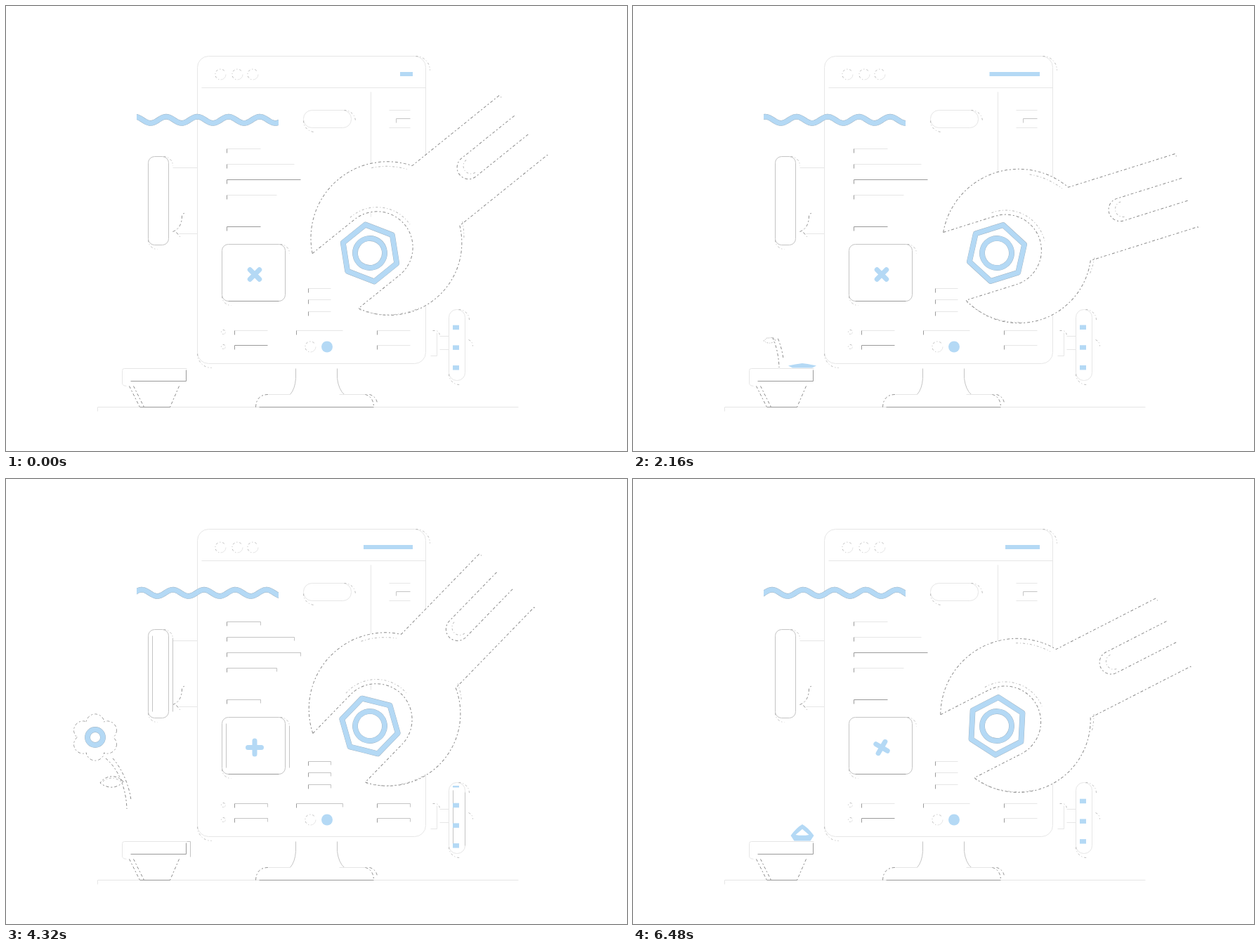
Animation of 884 by 634 pixels, one loop 6.56 s. Source, as an HTML page:

```html
<!DOCTYPE html>
<html lang="en">
<head>
<meta charset="utf-8">
<title>Site under repair</title>
<style>
html, body { margin: 0; width: 100%; height: 100%; overflow: hidden; background: #fff; }
svg { display: block; width: 884px; height: 634px; }
path, rect, circle, polyline, polygon { fill: none; stroke-width: 1; }
.light { stroke: #e6e6e6; }
.mid { stroke: #c4c4c4; }
.dark { stroke: #9a9a9a; }
.dash { stroke: #bbb; stroke-dasharray: 3 3 1 3; }
.edge { stroke: #8c8c8c; stroke-dasharray: 4 3 2 3; }
.white { fill: #fff; }
.blue { fill: #b4d9f5; }
.band { stroke: #b4d9f5; stroke-width: 7; stroke-linejoin: round; }
.rim { stroke: #9fb1bf; stroke-width: 7.8; stroke-linejoin: round; }
</style>
</head>
<body>
<svg viewBox="0 0 884 634">
  <defs>
    <clipPath id="waveClip"><rect x="186" y="150" width="202" height="24"/></clipPath>
    <clipPath id="stemClip"><rect id="stemBox" x="150" width="80" height="200"/></clipPath>
  </defs>
  <g id="scene" transform="translate(.5 .5)"></g>
  <g id="extra" transform="translate(.5 .5)"></g>

  <rect id="bar" class="blue" y="94" height="6"/>
  <circle class="blue" cx="457" cy="485.5" r="8"/>
  <g clip-path="url(#waveClip)">
    <polyline id="waveRim" class="rim"/>
    <polyline id="wave" class="band"/>
  </g>
  <path id="cross" d="M-9.5 0H9.5M0 -9.5V9.5" style="stroke:#b4d9f5;stroke-width:7;stroke-linecap:round"/>
  <g id="valve"></g>

  <g id="plant">
    <g clip-path="url(#stemClip)">
      <path class="edge" d="M178 443C196 458 207 485 208 515M188 443C203 460 212 485 214 503"/>
    </g>
    <g id="leaf">
      <path class="edge" d="M0 0C-8 -10 -25 -10 -33 2C-22 11 -8 10 0 0"/>
      <path class="dash" d="M-29 0C-22 -7 -10 -6 -4 0"/>
    </g>
    <g id="bloom">
      <g id="petals"></g>
      <circle class="rim" r="11"/>
      <circle class="band" r="11"/>
    </g>
  </g>
  <path id="drop" class="blue" d="M0 -10C3 -4 8 -1 8 3A8 7 0 0 1 -8 3C-8 -1 -3 -4 0 -10Z"/>
  <path id="splash" class="blue" fill-rule="evenodd"/>

  <g id="wrench">
    <path class="white" d="M-64 -51H13A51 51 0 0 1 13 51H-64A109 109 0 0 0 129 50H286V-59H125A109 109 0 0 0 -64 -51Z"/>
    <path class="edge" d="M-64 -51A109 109 0 0 1 125 -59H284l1 4"/>
    <path class="edge" d="M-62 51A103 103 0 0 0 124 50H284l1 4"/>
    <path class="dash" d="M-62 53A109 109 0 0 0 5 105M118 67A109 109 0 0 0 131 47M78 -93A103 103 0 0 1 116 -60"/>
    <path class="edge" d="M-64 -51H13A51 51 0 0 1 13 51H-62"/>
    <path class="dash" d="M10 -57A57 57 0 0 1 70 4"/>
    <path class="edge" d="M283 -23H186A16.5 16.5 0 0 0 186 10H283"/>
    <path class="dash" d="M190 -17A11 11 0 0 0 190 5"/>
  </g>
  <g id="nut">
    <polygon class="rim"/>
    <polygon class="band"/>
    <circle class="rim" r="21"/>
    <circle class="band" r="21"/>
  </g>
</svg>
<script>
const LOOP = 6560, STEP = 80;
const $ = id => document.getElementById(id);
const set = (id, attrs) => { for (const k in attrs) $(id).setAttribute(k, attrs[k]); };
const show = (id, on) => { $(id).style.display = on ? '' : 'none'; };
const clamp = x => Math.min(1, Math.max(0, x));
const smooth = x => (1 - Math.cos(Math.PI * clamp(x))) / 2;

// Eased track: time, value, time, value, ...
function track(t, keys) {
  for (let i = 2; i < keys.length; i += 2) {
    if (t <= keys[i]) {
      const [t0, a, t1, b] = keys.slice(i - 2, i + 2);
      return a + (b - a) * smooth((t - t0) / (t1 - t0));
    }
  }
  return keys[keys.length - 1];
}

let scene = '', extra = '';
const path = (cls, d) => { scene += `<path class="${cls}" d="${d}"/>`; };
const more = (cls, d) => { extra += `<path class="${cls}" d="${d}"/>`; };

// Panel with a thick white rim: its lit edges, plus two broken corners
function panel(x, y, w, h, r, cls = 'light') {
  const R = r + 4;
  scene += `<rect class="${cls}" x="${x}" y="${y}" width="${w}" height="${h}" rx="${r}"/>`;
  path('dash', `M${x + w + 6 - R} ${y}a${R} ${R} 0 0 1 ${R} ${R}M${x} ${y + h + 6 - R}a${R} ${R} 0 0 0 ${R} ${R}`);
}
// Far sides of the rim, seen only briefly
function farSides(x, y, w, h, r) {
  more('mid', `M${x + 6} ${y + r}V${y + h - r}M${x + w + 6} ${y + r + 3}V${y + h - r}`);
}
function row(x, y, w, cls = 'light') {
  path(cls, `M${x} ${y}h${w}`);
  path('dark', `M${x} ${y}v6`);
  more('mid', `M${x} ${y}h${w}v5`);
}
function ring(x, y, r) {
  path('dash', `M${x + r * .7} ${y - r * .7}A${r} ${r} 0 1 0 ${x} ${y + r}`);
  path('light', `M${x + r} ${y}A${r} ${r} 0 0 1 ${x} ${y + r}`);
}

// Window
panel(272, 71, 325, 438, 16);
path('light', 'M278 116H597M519 122V300');
[305, 329, 351].forEach(x => ring(x, 97, 7.5));
panel(423, 148, 68, 25, 12);
path('light', 'M545 148h30M545 173h30');
path('mid', 'M555 166v-6h20');
row(314, 203, 48);
row(314, 225, 96);
row(314, 247, 105, 'dark');
row(314, 269, 71);
row(314, 314, 48, 'dark');
panel(307, 339, 90, 81, 9, 'mid');
farSides(307, 339, 90, 81, 9);
path('dark', 'M316 420H388');
[402, 418, 435].forEach(y => row(430, y, 32));
[464, 485].forEach(y => ring(309, y, 3));
row(325, 462, 47);
row(325, 483, 47, 'dark');
row(413, 462, 66);
row(528, 462, 47);
row(528, 483, 47);
ring(433, 485, 7.5);

// Floor and stand
path('light', 'M130 577V571H729');
path('mid', 'M412 516V530Q411 545 404 553M471 516V530Q473 546 481 553');
path('light', 'M373 553H404M474 553H511');
path('edge', 'M355 571Q356 553 373 553M511 553Q522 556 523 570M517 553Q527 556 528 566');
path('dark', 'M360 571H523');

// Tap
panel(202, 214, 29, 126, 9, 'mid');
farSides(202, 214, 29, 126, 9);
path('light', 'M237 230H272M272 324H246');
path('edge', 'M237 321Q250 316 250 298q2 -5 6 -2M242 322l5 6');

// Valve
panel(630, 432, 23, 101, 11);
farSides(630, 432, 17, 101, 11);
path('light', 'M604 498H613V465M617 470H630M617 489H630');
path('dash', 'M607 462H612Q617 464 617 470M658 475Q664 478 664 484');

// Pot
path('light', 'M257 516H168Q165 516 165 519V538Q166 541 171 541');
path('dark', 'M177 534H256V518M190 571H233');
path('edge', 'M175 541L190 571M181 541L196 571M246 541L233 571');
more('mid', 'M257 516H262V538');

$('scene').innerHTML = scene;
$('extra').innerHTML = extra;

// Petals: outlines first, white discs over them
const petals = (cls, r) => Array.from({ length: 6 }, (_, i) => {
  const a = (i * 60 + 30) * Math.PI / 180;
  return `<circle class="${cls}" cx="${20 * Math.cos(a)}" cy="${20 * Math.sin(a)}" r="${r}"/>`;
}).join('');
$('petals').innerHTML = petals('edge', 13) + petals('white', 12.5) + '<circle class="white" r="20"/>';

$('valve').innerHTML = '<rect class="blue" x="636" width="9" height="6"/>'.repeat(4);
const cogs = [...$('valve').children];

const hex = Array.from({ length: 6 }, (_, i) =>
  [41 * Math.sin(i * Math.PI / 3), -41 * Math.cos(i * Math.PI / 3)].join()).join(' ');
document.querySelectorAll('#nut polygon').forEach(p => p.setAttribute('points', hex));

function turnWrench(t) {
  const a = track(t, [-206, 16.5, 108, 47, 240, 47, 660, 16.5, 800, 16.5, 1180, 47, 1440, 47,
    1960, 16.5, 2110, 16.5, 2560, 47, 2840, 47, 3360, 16.5, 3580, 16.5, 3920, 47, 4260, 47,
    4750, 16.5, 4810, 16.5, 5190, 47, 5760, 47, 6240, 16.5, 6354, 16.5, 6668, 47]);
  set('wrench', { transform: `translate(518 352) rotate(${-a})` });
  set('nut', { transform: `translate(518 352) rotate(${30 - a})` });
}

function moveWave(t) {
  const len = 44.4, shift = 228 + len * t / 695;
  let pts = '';
  for (let x = 180; x <= 394; x += 2) {
    pts += `${x},${162.3 - 4.6 * Math.cos((x - shift) / len * 2 * Math.PI)} `;
  }
  set('wave', { points: pts });
  set('waveRim', { points: pts });
}

function sizeBar(t) {
  const grow = x => 1 - (1 - clamp(x)) ** 3;
  const w = 75 * (t < 3500 ? grow(.0874 + t / 3905)
    : t < 5600 ? 1 - clamp((t - 3500) / 2024) ** 3
    : grow((t - 5600) / 2960));
  set('bar', { x: 579 - w, width: w });
}

function growPlant(t) {
  const on = t > 1050 && t < 5520;
  show('plant', on);
  if (!on) return;
  const dx = track(t, [4000, 0, 4320, -36, 4720, -78, 5060, -27, 5500, 20]);
  const dy = -45 * (Math.max(0, t - 4000) / 320) ** 1.63;
  set('plant', { transform: `translate(${dx} ${dy})` });
  set('stemBox', { y: track(t, [1050, 515, 1280, 488, 2160, 472, 3040, 462, 3640, 443]) });
  set('leaf', { transform: `translate(203 476) scale(${smooth((t - 1700) / 900)})` });
  const s = smooth((t - 3600) / 320);
  show('bloom', s > 0);
  set('bloom', { transform: `translate(163 413) scale(${s})` });
}

function drip(t) {
  const T = 1382, p = (t - 2160 + 2 * T) % T;
  show('drop', p > 800 && p < 1270);
  const y = 349 + 165 * (Math.max(0, p - 880) / 400) ** 2;
  set('drop', { transform: `translate(241 ${y}) scale(${smooth((p - 780) / 100)})` });

  const q = p > 1290 ? p - T : p;
  show('splash', q < 290);
  if (q >= 290) return;
  const u = q / 174, h = Math.max(2, 6 + 17 * u), w = 20 - 3.5 * Math.max(0, u), m = Math.min(7, h * .4);
  const k = Math.max(0, u) * .58, c = 515 - h * .35;
  const hole = k > .02
    ? `M241 ${c - h * .62 * k}L${241 + w * k} ${c}Q241 ${c + 3 * k} ${241 - w * k} ${c}Z` : '';
  set('splash', { d: `M241 ${515 - h}Q${241 + w * .5} ${515 - h * .8} ${241 + w} ${515 - m}L${241 + w * .7} 515.5H${241 - w * .7}L${241 - w} ${515 - m}Q${241 - w * .5} ${515 - h * .8} 241 ${515 - h}Z${hole}` });
}

function turnValve(t) {
  const o = track(t, [0, 3, 400, 0, 1700, 0, 2240, 3, 2700, 0, 3500, 0, 4320, 10, 5000, 0, 5800, 0, 6480, 4, 6560, 3]);
  cogs.forEach((c, i) => {
    const y = 423 + i * 28.7 + o, top = Math.max(437, y);
    c.setAttribute('y', top);
    c.setAttribute('height', Math.max(0, y + 6.5 - top));
  });
}

function spinCross(t) {
  const turn = 90 * (smooth((t - 4140) / 360) + smooth((t - 6214) / 360));
  set('cross', { transform: `translate(354 382.5) rotate(${45 + turn})` });
}

function draw(now) {
  const t = Math.floor(now % LOOP / STEP) * STEP;
  turnWrench(t);
  moveWave(t);
  sizeBar(t);
  growPlant(t);
  drip(t);
  turnValve(t);
  spinCross(t);
  show('extra', t >= 4240 && t < 4480);
}

let start;
function tick(now) {
  start ??= now;
  draw(now - start);
  requestAnimationFrame(tick);
}
draw(0);
requestAnimationFrame(tick);
</script>
</body>
</html>
```
